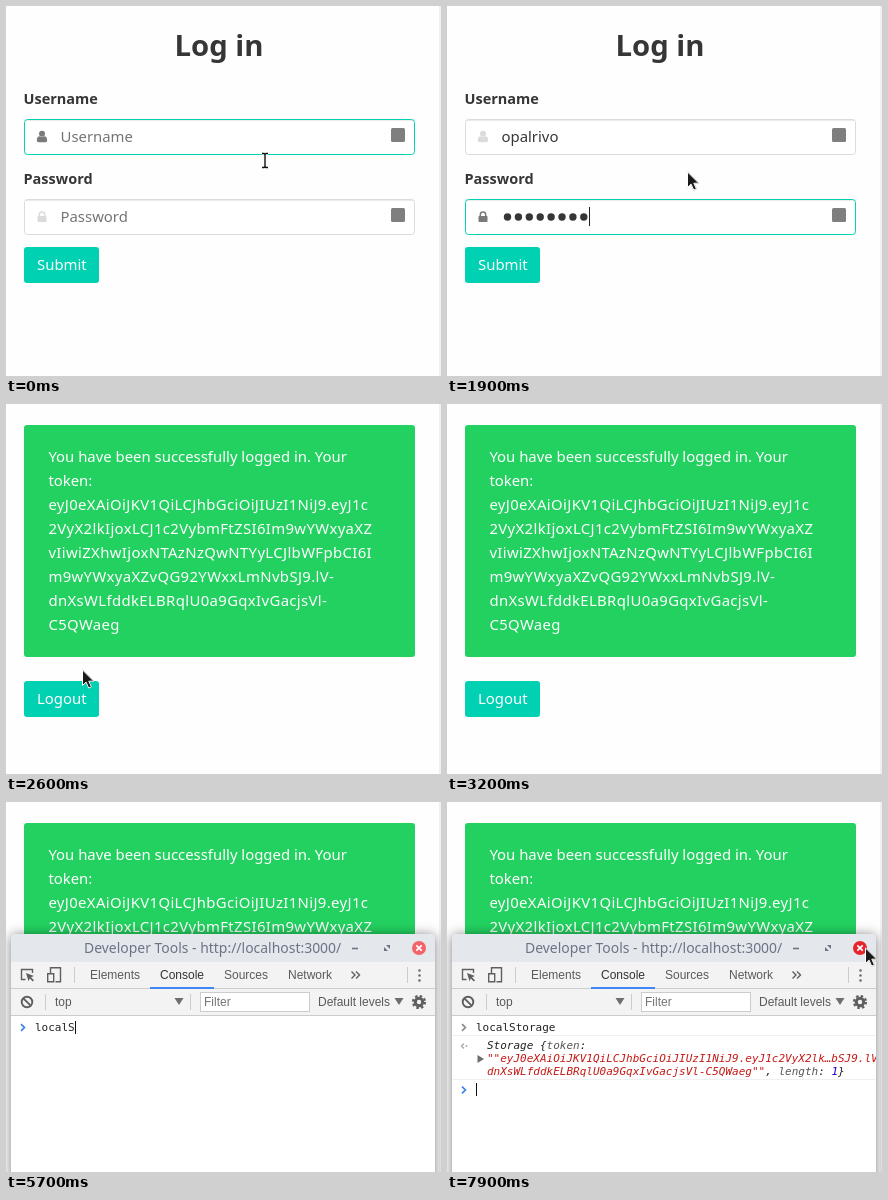
These frames come from a looping animation (435x370 px, 8000 ms). An HTML page:

```html
<!DOCTYPE html>
<html lang="en">
<head>
<meta charset="utf-8">
<title>Log in</title>
<style>
  html, body { margin: 0; width: 100%; height: 100%; overflow: hidden; background: #fefefe; }
  svg { display: block; }
  text { white-space: pre; }
  .page { font: 14.9px "Noto Sans", sans-serif; fill: #363636; }
  .title { font-size: 29.3px; font-weight: 600; text-anchor: middle; }
  .label { font-size: 14.5px; font-weight: 600; }
  .light { fill: #fff; }
  .hint { fill: #757575; }
  .token { letter-spacing: .36px; }
  .box { fill: #fff; stroke: #dbdbdb; }
  .box.hover { stroke: #b5b5b5; }
  .box.focus { stroke: #00d1b2; }
  .icon { fill: #dbdbdb; stroke: #dbdbdb; }
  .icon.focus { fill: #7a7a7a; stroke: #7a7a7a; }
  .btn { fill: #00d1b2; }
  .btn.hover { fill: #00c4a7; }
  .btn.focus { filter: drop-shadow(0 0 3px rgba(0, 209, 178, .3)); }
  .frame { fill: #e4e7eb; filter: drop-shadow(0 1px 6px rgba(0, 0, 0, .5)); }
  .caption { font: 13.95px "Noto Sans", sans-serif; fill: #6b7485; }
  .ui { font: 12px "Liberation Sans", Arial, sans-serif; fill: #5a5a5a; }
  .rule { stroke: #ccc; fill: none; }
  .tool { stroke: #5f5f5f; fill: none; stroke-width: 1.4; }
  .solid { fill: #6e6e6e; }
  .mono { font: 11px "DejaVu Sans Mono", monospace; fill: #222; }
  .obj { font-style: italic; }
  .key { fill: #565656; }
  .str { fill: #c41a16; }
  .num { fill: #1c00cf; }
  .close { fill: #f2636a; }
  .close.hover { fill: #e5242e; }
  #arrow { filter: drop-shadow(0 .5px .7px rgba(0, 0, 0, .5)); }
</style>
</head>
<body>
<svg width="435" height="370" viewBox="0 0 435 370">
  <defs>
    <clipPath id="inside"><rect x="5" y="213" width="424" height="157"/></clipPath>
    <path id="drop" class="solid" d="M0 0h9l-4.5 7z"/>
    <path id="chev" d="M0 .7l3.4 3.3-3.4 3.3" fill="none" stroke-width="1.7"/>
    <path id="bar" d="M-3-7.5h2L0-6.5 1-7.5h2M0-6.5V5.5M-3 6.5h2L0 5.5 1 6.5h2"/>
  </defs>
  <rect width="435" height="370" fill="#fefefe"/>

  <g id="login" class="page">
    <text class="title" x="213" y="50">Log in</text>
    <text class="label" x="17.5" y="98">Username</text>
    <text class="label" x="17.5" y="178">Password</text>

    <rect id="userBox" class="box" x="18.5" y="113.5" width="390" height="35" rx="3"/>
    <path d="M20 114.5H407" stroke="#0a0a0a" stroke-opacity=".08"/>
    <g id="userIcon" class="icon">
      <g stroke="none">
        <circle cx="36" cy="127.8" r="3"/>
        <path d="M30.8 134.5c0-2.8 1-4.2 2.7-4.3q2.5 1.6 5 0c1.7.1 2.7 1.5 2.7 4.3q0 1.8-1.8 1.8h-6.8q-1.8 0-1.8-1.8z"/>
      </g>
    </g>
    <text id="userHint" class="hint" x="54.5" y="136">Username</text>
    <text id="user" x="54.5" y="136"></text>
    <rect x="385" y="122" width="14" height="14" rx="1.5" fill="#7f7f7f"/>

    <rect id="passBox" class="box" x="18.5" y="193.5" width="390" height="35" rx="3"/>
    <path d="M20 194.5H407" stroke="#0a0a0a" stroke-opacity=".08"/>
    <g id="passIcon" class="icon">
      <rect x="31.5" y="210" width="9" height="6" rx=".8" stroke="none"/>
      <path d="M33.3 210.5v-1.7a2.7 2.7 0 0 1 5.4 0v1.7" fill="none" stroke-width="1.5"/>
    </g>
    <text id="passHint" class="hint" x="54.5" y="216">Password</text>
    <g id="dots"></g>
    <rect x="385" y="202" width="14" height="14" rx="1.5" fill="#7f7f7f"/>
    <rect id="formCaret" width="1" height="19" fill="#222"/>

    <rect id="submit" class="btn" x="18" y="241" width="75" height="36" rx="3"/>
    <text class="light" x="31" y="264">Submit</text>
  </g>

  <g id="done" class="page">
    <rect x="18" y="21" width="391" height="232" rx="3" fill="#23d160"/>
    <g id="message" class="light"></g>
    <rect class="btn" x="18" y="277" width="75" height="36" rx="3"/>
    <text class="light" x="31" y="300">Logout</text>
  </g>
  <rect x="433" width="2" height="370" fill="#f0f0f0"/>

  <g id="tools">
    <path class="frame" d="M5 400V136q0-4 4-4H425q4 0 4 4V400z"/>
    <text class="caption" x="78" y="151">Developer Tools - http://localhost:3000/</text>
    <path d="M346 146.5h6" stroke="#6b7485" stroke-width="1.6"/>
    <path d="M380 143h4v4zM378 145v4h4z" fill="#6b7485"/>
    <circle id="close" class="close" cx="413" cy="146" r="7"/>
    <path d="M410.3 143.3l5.4 5.4m0-5.4l-5.4 5.4" stroke="#fff" stroke-width="1.7"/>

    <rect x="5" y="160" width="424" height="53" fill="#f3f3f3"/>
    <path class="rule" d="M5 186.5H429M5 213.5H429M68.5 165v16M401.5 165v16M39.5 192v16M184.5 192v16"/>
    <rect x="144" y="185" width="64" height="2" fill="#4285f4"/>
    <g class="tool">
      <path d="M26.5 171v-3.5h-11v10h4"/>
      <path d="M20 171l8 3-3 1.3 3 3-1.2 1.2-3-3-1.3 2.8z" fill="#5f5f5f" stroke="none"/>
      <path d="M44.5 171v-5.3h10v14h-5M41.7 171.7h6v8h-6z"/>
      <path d="M345.5 169.5l3.5 3.5-3.5 3.5m4.5-7l3.5 3.5-3.5 3.5"/>
      <circle cx="21" cy="200" r="5.3" stroke-width="1.9"/>
      <path d="M17.3 196.3l7.4 7.4" stroke-width="1.9"/>
      <circle cx="413" cy="200" r="3.7" stroke-width="3"/>
      <circle cx="413" cy="200" r="6" stroke-width="2.2" stroke-dasharray="2.5 2.212"/>
    </g>
    <g class="solid">
      <circle cx="413.5" cy="168.5" r="1.3"/><circle cx="413.5" cy="173.5" r="1.3"/><circle cx="413.5" cy="178.5" r="1.3"/>
    </g>
    <use href="#drop" x="168.5" y="196"/>
    <use href="#drop" x="388.5" y="196"/>
    <rect x="194.5" y="190.5" width="109" height="19" fill="#fff" stroke="#ccc"/>
    <g class="ui">
      <text x="84" y="177">Elements</text>
      <text x="154" y="177" fill="#333">Console</text>
      <text x="218" y="177">Sources</text>
      <text x="282" y="177">Network</text>
      <text x="49" y="204">top</text>
      <text x="198" y="204" fill="#757575">Filter</text>
      <text x="312" y="204">Default levels</text>
    </g>

    <rect x="5" y="214" width="424" height="156" fill="#fff"/>
    <text id="command" class="mono" x="29" y="229"></text>
    <g id="result" class="mono" clip-path="url(#inside)">
      <use href="#chev" x="15" y="221.5" stroke="#8a8a8a"/>
      <path d="M5 233.5H429M5 277.5H429" stroke="#f0f0f0"/>
      <path d="M17 241.5l-2.5 2.5 2.5 2.5" fill="none" stroke="#a8a8a8" stroke-width="1.3"/>
      <circle cx="19.5" cy="244" r="1" fill="#a8a8a8"/>
      <path class="solid" d="M30.5 253v8l6.5-4z"/>
      <g class="obj">
        <text x="40" y="247">Storage {<tspan class="key">token</tspan>:</text>
        <text class="str" x="40" y="260">""eyJ0eXAiOiJKV1QiLCJhbGciOiJIUzI1NiJ9.eyJ1c2VyX2lk…bSJ9.lV-</text>
        <text x="40" y="273"><tspan class="str">dnXsWLfddkELBRqlU0a9GqxIvGacjsVl-C5QWaeg""</tspan>, <tspan class="key">length</tspan>: <tspan class="num">1</tspan>}</text>
      </g>
    </g>
    <use id="prompt" href="#chev" stroke="#3b82f0"/>
    <rect id="toolCaret" width="1" height="13" fill="#111"/>
  </g>

  <g id="mouse">
    <g id="beam" fill="none">
      <use href="#bar" stroke="#fff" stroke-width="3"/>
      <use href="#bar" stroke="#111" stroke-width="1.4"/>
    </g>
    <path id="hand" d="M-1.5 0Q0-1.5 1.5 0V5.5l5.5 1q2 .5 2 2.5v3l-1.5 3H0L-4.5 8.5q.5-2 3 0z" fill="#111" stroke="#fff"/>
    <path id="arrow" d="M.5 0V15.5l3.6-3.4 2.6 6 2.7-1.2-2.6-5.7h5z" fill="#1a1a1a" stroke="#fff"/>
  </g>
</svg>
<script>
  const $ = id => document.getElementById(id);
  const LOOP = 8000, STEP = 100;
  const NAME = "opalrivo", COMMAND = "localStorage";
  const MESSAGE = [
    "You have been successfully logged in. Your",
    "token:",
    "eyJ0eXAiOiJKV1QiLCJhbGciOiJIUzI1NiJ9.eyJ1c",
    "2VyX2lkIjoxLCJ1c2VybmFtZSI6Im9wYWxyaXZ",
    "vIiwiZXhwIjoxNTAzNzQwNTYyLCJlbWFpbCI6I",
    "m9wYWxyaXZvQG92YWxxLmNvbSJ9.lV-",
    "dnXsWLfddkELBRqlU0a9GqxIvGacjsVl-",
    "C5QWaeg"
  ];
  // Pointer stops: step, x, y
  const PATH = [
    [18, 259, 155], [23, 72, 261], [25, 72, 261], [27, 79, 270],
    [30, 165, 333], [67, 119, 324], [69, 119, 324], [78, 418, 146]
  ];

  function add(parent, tag, attrs, text = "") {
    const el = document.createElementNS("http://www.w3.org/2000/svg", tag);
    for (const key in attrs) el.setAttribute(key, attrs[key]);
    el.textContent = text;
    return parent.appendChild(el);
  }
  MESSAGE.forEach((line, i) =>
    add($("message"), "text", { x: 42.4, y: 58 + 24 * i, class: i > 1 ? "token" : "" }, line));
  for (let i = 0; i < 8; i++) add($("dots"), "circle", { cx: 60.5 + 10.9 * i, cy: 211, r: 3.7 });

  const clamp = (v, lo, hi) => Math.max(lo, Math.min(hi, v));
  const show = (id, on) => { $(id).style.display = on ? "" : "none"; };
  const mark = (id, name, on) => $(id).classList.toggle(name, on);
  const place = (id, x, y) => { $(id).setAttribute("x", x); $(id).setAttribute("y", y); };

  function pointer(k) {
    const i = PATH.findIndex(p => p[0] >= k);
    if (i < 0) return PATH[PATH.length - 1].slice(1);
    if (i === 0) return PATH[0].slice(1);
    const [k0, x0, y0] = PATH[i - 1], [k1, x1, y1] = PATH[i];
    const p = (k - k0) / (k1 - k0), e = p * p * (3 - 2 * p);
    return [x0 + (x1 - x0) * e, y0 + (y1 - y0) * e].map(Math.round);
  }

  function drawForm(k) {
    const inUser = k < 10, inPass = k >= 10 && k < 24;
    const typed = clamp(k - 1, 0, 8), dots = clamp(k - 10, 0, 8);
    $("user").textContent = NAME.slice(0, typed);
    show("userHint", !typed);
    show("passHint", !dots);
    [...$("dots").children].forEach((dot, i) => { dot.style.display = i < dots ? "" : "none"; });
    for (const part of ["Box", "Icon"]) {
      mark("user" + part, "focus", inUser);
      mark("pass" + part, "focus", inPass);
    }
    mark("userBox", "hover", k >= 10 && k < 19);
    mark("submit", "hover", k >= 23);
    mark("submit", "focus", k === 25);
    show("formCaret", k > 0 && k < 24);
    if (inUser) place("formCaret", 55 + (typed ? Math.round($("user").getComputedTextLength()) : 0), 121);
    else place("formCaret", Math.round(55 + 10.9 * dots), 201);
  }

  function drawTools(k) {
    const count = k < 52 ? 0 : k < 58 ? k - 51 : COMMAND.length;
    const sent = k >= 59;
    $("command").textContent = COMMAND.slice(0, count);
    show("result", sent);
    place("prompt", 15, sent ? 284 : 221.5);
    const blinkOff = (k >= 60 && k < 70 && k % 2 === 0) || (k >= 72 && k < 75);
    show("toolCaret", k >= 52 && !blinkOff);
    place("toolCaret", sent ? 29 : Math.round(29 + 6.62 * count), sent ? 281 : 219);
    mark("close", "hover", k >= 79);
  }

  function draw(k) {
    const logged = k >= 26, open = k >= 49;
    show("login", !logged);
    show("done", logged);
    show("tools", open);
    if (!logged) drawForm(k);
    if (open) drawTools(k);

    const kind = k < 19 ? "beam" : k >= 23 && k < 26 ? "hand" : "arrow";
    for (const id of ["beam", "hand", "arrow"]) show(id, id === kind);
    show("mouse", k < 32 || k >= 67);
    $("mouse").setAttribute("transform", `translate(${pointer(k)})`);
  }

  const start = performance.now();
  let last = -1;
  function tick() {
    const k = Math.floor((performance.now() - start) % LOOP / STEP);
    if (k !== last) draw(last = k);
    requestAnimationFrame(tick);
  }
  tick();
</script>
</body>
</html>
```
